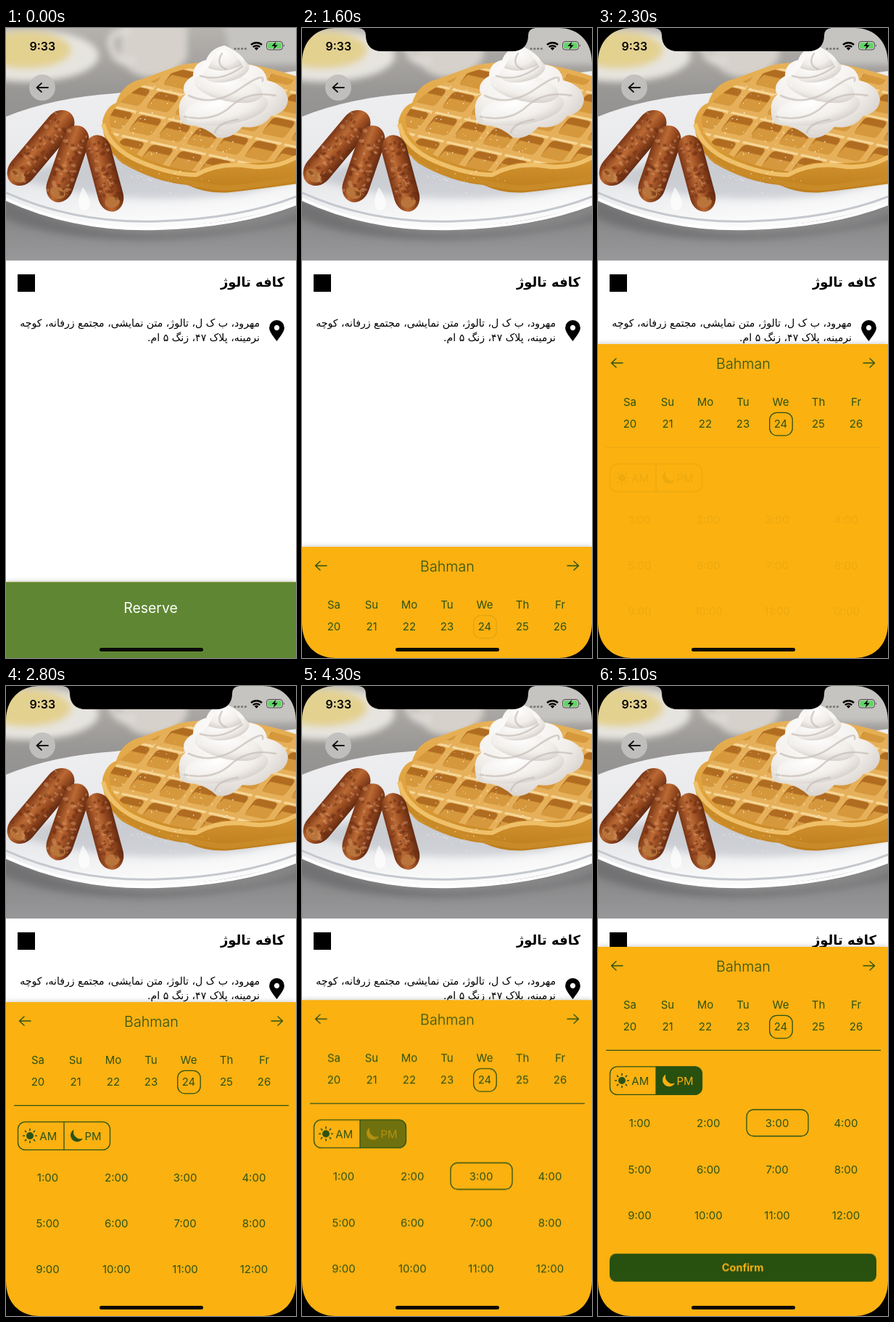
Animation of 400x867 px, one loop 5.2 s. Source, as an HTML page:

```html
<!DOCTYPE html>
<html lang="en">
<head>
<meta charset="utf-8">
<title>Table reservation</title>
<style>
  html, body { margin: 0; width: 100%; height: 100%; overflow: hidden; background: #fff; }
  svg { display: block; width: 400px; height: 867px; }
  text { font: 400 15px Inter, "Liberation Sans", sans-serif; text-anchor: middle; }
  .fa { font: 400 14.1px "DejaVu Sans", sans-serif; text-anchor: start; }
  .fa.name { font: 700 18px "DejaVu Sans", sans-serif; }
  .clock { font-weight: 600; font-size: 16px; }
  .head { font-weight: 300; font-size: 19.7px; }
  .ink { fill: #2b5315; }
  .line { fill: none; stroke: #2b5315; stroke-width: 1.3; }
  .arrow { fill: none; stroke-width: 1.4; stroke-linecap: round; stroke-linejoin: round; }
  #shade { filter: drop-shadow(0 -1px 3px rgba(0, 0, 0, .2)); }

  /* One loop is 5200 ms, so 1% lasts 52 ms. */
  .anim { animation: 5200ms linear infinite both; }
  #sheet { animation-name: rise; }
  #bezel { animation-name: bezel; }
  #green { animation-name: green; }
  #reserve { animation-name: reserve; }
  #calendar { animation-name: calendar; }
  #day { animation-name: day; }
  #slots { animation-name: slots; }
  #time { animation-name: time; }
  #pmOn { animation-name: pm; }
  #confirm { animation-name: confirm; }
  .row0 { animation-name: nudge1; }
  .row1, .row2 { animation-name: nudge2; }

  @keyframes rise {
    0%, 4.8% { transform: translateY(762.5px); animation-timing-function: ease-in-out; }
    10%, 34.09% { transform: translateY(714px); animation-timing-function: ease-in-out; }
    42.35%, 62.8% { transform: translateY(435px); animation-timing-function: ease-in-out; }
    70.5%, 82.1% { transform: translateY(433px); animation-timing-function: ease-in-out; }
    90.5%, 100% { transform: translateY(359px); }
  }
  @keyframes bezel { 0%, 3.84% { opacity: 0; } 3.845%, 100% { opacity: 1; } }
  @keyframes green { 0%, 4.5% { opacity: 1; } 10%, 100% { opacity: 0; } }
  @keyframes reserve { 0%, 3.2% { opacity: 1; } 7.5%, 100% { opacity: 0; } }
  @keyframes calendar { 0%, 7.5% { opacity: 0; } 13.4%, 100% { opacity: 1; } }
  @keyframes day { 0%, 30% { opacity: 0; } 36.5%, 100% { opacity: 1; } }
  @keyframes slots { 0%, 43.5% { opacity: 0; } 53.6%, 100% { opacity: 1; } }
  @keyframes time { 0%, 62.5% { opacity: 0; } 71%, 100% { opacity: 1; } }
  @keyframes pm { 0%, 78.2% { opacity: 0; } 85%, 100% { opacity: 1; } }
  @keyframes confirm { 0%, 90.4% { opacity: 0; } 98%, 100% { opacity: 1; } }
  @keyframes nudge1 { 0%, 62.8% { transform: translateY(-1px); } 70.5%, 100% { transform: none; } }
  @keyframes nudge2 { 0%, 62.8% { transform: translateY(-2px); } 70.5%, 100% { transform: none; } }
</style>
</head>
<body>
<svg viewBox="0 0 400 867">
  <defs>
    <linearGradient id="table" x2="0" y2="1">
      <stop offset="0" stop-color="#b5b2ae"/><stop offset=".28" stop-color="#989694"/>
      <stop offset=".8" stop-color="#868687"/><stop offset="1" stop-color="#98989a"/>
    </linearGradient>
    <linearGradient id="plate" x2=".2" y2="1">
      <stop offset="0" stop-color="#f1f1f2"/><stop offset=".7" stop-color="#e6e7ea"/><stop offset="1" stop-color="#fafafa"/>
    </linearGradient>
    <linearGradient id="meat">
      <stop offset="0" stop-color="#7a3515"/><stop offset=".4" stop-color="#bb6a34"/>
      <stop offset=".65" stop-color="#9a4c21"/><stop offset="1" stop-color="#622a11"/>
    </linearGradient>
    <linearGradient id="crust" x2="0" y2="1">
      <stop offset="0" stop-color="#e6b158"/><stop offset=".6" stop-color="#dfa03a"/><stop offset="1" stop-color="#bd7d1c"/>
    </linearGradient>
    <radialGradient id="cream" cx=".4" cy=".3" r=".8">
      <stop offset="0" stop-color="#fff"/><stop offset=".6" stop-color="#f1eeea"/><stop offset="1" stop-color="#cfc8c2"/>
    </radialGradient>
    <pattern id="grid" width="40" height="32" patternUnits="userSpaceOnUse" patternTransform="matrix(1 .22 -.75 1 168 72)">
      <rect width="40" height="32" fill="#e6b05a"/>
      <rect x="5" y="5" width="31" height="23" rx="5" fill="#b06c20"/>
      <path d="M7 14h29v10q0 4-5 4H10q-5 0-5-4z" fill="#d6983c"/>
      <path d="M2 3h36" stroke="#f5d594" stroke-width="3"/>
    </pattern>
    <filter id="soft" x="-30%" y="-30%" width="160%" height="160%"><feGaussianBlur stdDeviation="5"/></filter>
    <clipPath id="photo"><path d="M0 0h400v320H0z"/></clipPath>
    <clipPath id="toggle"><rect x="16" y="164.5" width="128" height="39" rx="10"/></clipPath>
    <path id="back" d="M7 -6L.5 0L7 6M.5 0H16"/>
    <g id="pm">
      <path d="M93.5 175.5a9 9 0 1 0 12.5 12a9.6 9.6 0 0 1-12.5-12z"/>
      <text x="120" y="189.7">PM</text>
    </g>
  </defs>

  <rect width="400" height="867" fill="#fff"/>

  <g clip-path="url(#photo)">
    <rect width="400" height="320" fill="url(#table)"/>
    <g filter="url(#soft)">
      <ellipse cx="30" cy="38" rx="98" ry="36" fill="#e6e4de"/>
      <ellipse cx="28" cy="30" rx="62" ry="26" fill="#e3d190"/>
      <path d="M160 -10h90v50q-15 28-48 28t-45-28z" fill="#d6d1cb"/>
      <path d="M172 4q-42 0-20 36q12 12 26 2" fill="none" stroke="#dedad5" stroke-width="9"/>
      <path d="M300 -10h110v60H310z" fill="#c6c4c1"/>
      <path d="M-20 225Q90 290 240 282T420 245V262Q260 298 140 290T-20 250z" fill="#68696b" opacity=".7"/>
    </g>
    <path d="M-10 126Q60 96 150 90L410 58V238Q330 268 210 276Q90 280 -10 231z" fill="url(#plate)"/>
    <path d="M-10 222Q90 270 210 266T410 228" fill="none" stroke="#c5c8ce" stroke-width="3"/>
    <path d="M-10 231Q90 280 210 276T410 238" fill="none" stroke="#fff" stroke-width="4"/>
    <path d="M10 205Q150 250 330 228L400 210V170L150 160z" fill="#a9adb6" opacity=".45" filter="url(#soft)"/>
    <path d="M133 128Q138 108 152 103Q160 76 188 70L240 51Q320 36 410 70V213Q355 221 310 226Q278 229 250 216Q205 212 160 186Q133 164 133 128z" fill="url(#crust)"/>
    <path d="M143 122Q165 80 245 57Q320 44 410 76V172Q380 188 318 186Q290 182 268 198Q205 192 164 164Q141 146 143 122z" fill="url(#grid)"/>
    <path d="M134 132Q142 166 185 184T262 202Q296 184 335 190T410 172" fill="none" stroke="#efc069" stroke-width="6"/>
    <path d="M140 160Q165 190 225 206T310 220T410 206" fill="none" stroke="#c98a28" stroke-width="7"/>
    <g id="sausages"></g>
    <path d="M103 249q-7-8 3-30q15 22 7 30q-5 3-10 0z" fill="#fff" opacity=".7"/>
    <g fill="url(#cream)">
      <path d="M240 124Q235 102 247 92Q240 76 258 66Q258 48 276 44Q282 28 301 24Q326 34 332 50Q358 52 360 72Q386 78 389 98Q388 116 366 121Q352 140 326 136Q310 154 291 151Q278 138 258 134Q240 134 240 124z"/>
      <ellipse cx="304" cy="111" rx="58" ry="22" transform="rotate(-9 304 111)"/>
      <ellipse cx="307" cy="82" rx="48" ry="19" transform="rotate(12 307 82)"/>
      <ellipse cx="304" cy="59" rx="32" ry="15" transform="rotate(-12 304 59)"/>
      <path d="M279 55Q288 32 301 24Q314 29 326 51Q301 64 279 55z"/>
    </g>
    <path d="M252 93Q286 109 322 84T354 73M246 122Q286 130 310 108T372 93M268 66Q296 75 326 53M288 144Q292 130 320 126M298 35Q288 50 304 57" fill="none" stroke="#c9c1ba" stroke-width="2.5" stroke-linecap="round" opacity=".75"/>
    <g id="sugar" fill="#fff"></g>
  </g>

  <circle cx="50" cy="82" r="18" fill="#c2c0be" opacity=".95"/>
  <use href="#back" class="arrow" x="42" y="82" stroke="#111" style="stroke-width:1.8"/>

  <text class="clock" x="50.3" y="30.5">9:33</text>
  <g fill="#77736f"><circle cx="316" cy="28.5" r="1.6"/><circle cx="320.8" cy="28.5" r="1.6"/><circle cx="325.6" cy="28.5" r="1.6"/><circle cx="330.4" cy="28.5" r="1.6"/></g>
  <path d="M338 23.2a11 11 0 0 1 15 0M340.7 26.2a7 7 0 0 1 9.6 0" fill="none" stroke="#000" stroke-width="2.3"/>
  <path d="M342.6 27.8a4.6 4.6 0 0 1 5.8 0l-2.9 3z"/>
  <rect x="359.5" y="18.5" width="22" height="11.5" rx="3.5" fill="none" stroke="#4c4c48"/>
  <path d="M383 22.5q2 1.7 0 3.6z" fill="#4c4c48"/>
  <rect x="361.2" y="20.2" width="18.6" height="8.1" rx="2" fill="#62d567"/>
  <path d="M372.5 18.5l-6 6.6h3.8l-1.6 5l6-6.6h-3.8z"/>

  <rect x="16" y="339" width="24" height="24"/>
  <text class="fa name" direction="rtl" x="384" y="356">کافه تالوژ</text>
  <text class="fa" direction="rtl" x="350" y="411">مهرود، ب ک ل، تالوژ، متن نمایشی، مجتمع زرفانه، کوچه</text>
  <text class="fa" direction="rtl" x="350" y="430.5">نرمینه، پلاک ۴۷، زنگ ۵ ام.</text>
  <path fill-rule="evenodd" d="M373.5 402a10.4 10.4 0 0 1 10.4 10.4c0 6-6 12-10.4 18.6c-4.4-6.6-10.4-12.6-10.4-18.6a10.4 10.4 0 0 1 10.4-10.4zm0 6.8a3.7 3.7 0 1 0 .01 0z"/>

  <g id="sheet" class="anim">
    <rect id="shade" width="400" height="600" fill="#fbb110"/>
    <rect id="green" class="anim" width="400" height="600" fill="#5f8733"/>
    <text id="reserve" class="anim head" x="199.5" y="42" fill="#fff" style="font-weight:400;font-size:19.4px">Reserve</text>
    <g id="calendar" class="anim ink">
      <use href="#back" class="arrow" stroke="#2b5315" x="18" y="26"/>
      <use href="#back" class="arrow" stroke="#2b5315" transform="translate(382 26) scale(-1 1)"/>
      <text class="head" x="200.5" y="34">Bahman</text>
      <g id="days"></g>
      <rect id="day" class="anim line" x="236.7" y="94.3" width="31.5" height="31.5" rx="10"/>
    </g>
    <g id="slots" class="anim ink">
      <path class="line" d="M11 142.3H390"/>
      <circle cx="33" cy="184" r="5"/>
      <path id="rays" class="line" style="stroke-width:1.7;stroke-linecap:round"/>
      <text x="58.3" y="189.7">AM</text>
      <use href="#pm"/>
      <g id="pmOn" class="anim" clip-path="url(#toggle)">
        <path d="M80 164h65v40H80z" fill="#28500f"/>
        <use href="#pm" fill="#fbb110"/>
      </g>
      <rect class="line" x="16.5" y="164.8" width="127" height="38.6" rx="10"/>
      <path class="line" d="M80 165v38"/>
      <g id="times"></g>
      <rect id="time" class="anim line" x="205" y="224" width="85" height="36.5" rx="9.5"/>
    </g>
    <g id="confirm" class="anim">
      <rect x="16" y="422" width="368" height="39" rx="9" fill="#28500f"/>
      <text x="199.7" y="446.5" fill="#fbb110" style="font-weight:700;font-size:14.5px">Confirm</text>
    </g>
  </g>

  <g id="bezel" class="anim">
    <path d="M0 0H46C18 0 0 19 0 48zM400 0H354C382 0 400 19 400 48zM0 867H46C18 867 0 848 0 819zM400 867H354C382 867 400 848 400 819z"/>
    <path d="M78 0Q88 1 88 10C88 24 96 32 110 32H290C304 32 312 24 312 10Q312 1 322 0z"/>
  </g>
  <rect x="129" y="853" width="143" height="5" rx="2.5" fill="#080806"/>
</svg>

<script>
  const $ = id => document.getElementById(id);
  const label = (x, y, str, cls = '') => `<text x="${x}" y="${y}" class="${cls}">${str}</text>`;

  $('days').innerHTML = ['Sa', 'Su', 'Mo', 'Tu', 'We', 'Th', 'Fr'].map((name, i) => {
    const x = 44 + i * 52;
    return label(x, 84.7, name) + label(x, 115, 20 + i);
  }).join('');

  const rowY = [247.5, 311.5, 374.5];
  $('times').innerHTML = Array.from({ length: 12 }, (_, i) => {
    const row = Math.floor(i / 4);
    return label(57.5 + (i % 4) * 94.8, rowY[row], `${i + 1}:00`, `anim row${row}`);
  }).join('');

  $('rays').setAttribute('d', Array.from({ length: 8 }, (_, i) => {
    const c = Math.cos(i * Math.PI / 4), s = Math.sin(i * Math.PI / 4);
    return `M${33 + 7.5 * c} ${184 + 7.5 * s}L${33 + 9.3 * c} ${184 + 9.3 * s}`;
  }).join(''));

  let seed = 7;
  const rand = () => (seed = seed * 16807 % 2147483647) / 2147483647;

  // Each sausage: centre, width, length, tilt.
  const links = [[48, 165, 38, 126, 40], [85, 187, 37, 110, 19], [136, 200, 35, 108, -15]];
  $('sausages').innerHTML = links.map(([x, y, w, h, tilt]) => {
    let marks = '';
    for (let i = 0; i < 60; i++) {
      const mx = (rand() - .5) * w * .78, my = (rand() - .5) * h * .8;
      marks += `<ellipse cx="${mx}" cy="${my}" rx="${1 + rand() * 3}" ry="${1 + rand() * 2}" fill="${rand() < .5 ? '#d9996a' : '#64270f'}" opacity=".45"/>`;
    }
    return `<g transform="translate(${x} ${y}) rotate(${tilt})">
      <rect x="${-w / 2}" y="${-h / 2}" width="${w}" height="${h}" rx="${w / 2}" ry="${w * .6}" fill="url(#meat)"/>
      <ellipse cy="${h / 2 - 13}" rx="${w * .3}" ry="8" fill="#b8743a"/>${marks}</g>`;
  }).join('');

  $('sugar').innerHTML = Array.from({ length: 150 }, () => {
    const a = rand() * 6.283, r = Math.sqrt(rand());
    return `<circle cx="${230 + 85 * r * Math.cos(a)}" cy="${150 + 80 * r * Math.sin(a)}" r="${.4 + rand() * .6}" opacity=".7"/>`;
  }).join('');
</script>
</body>
</html>
```
